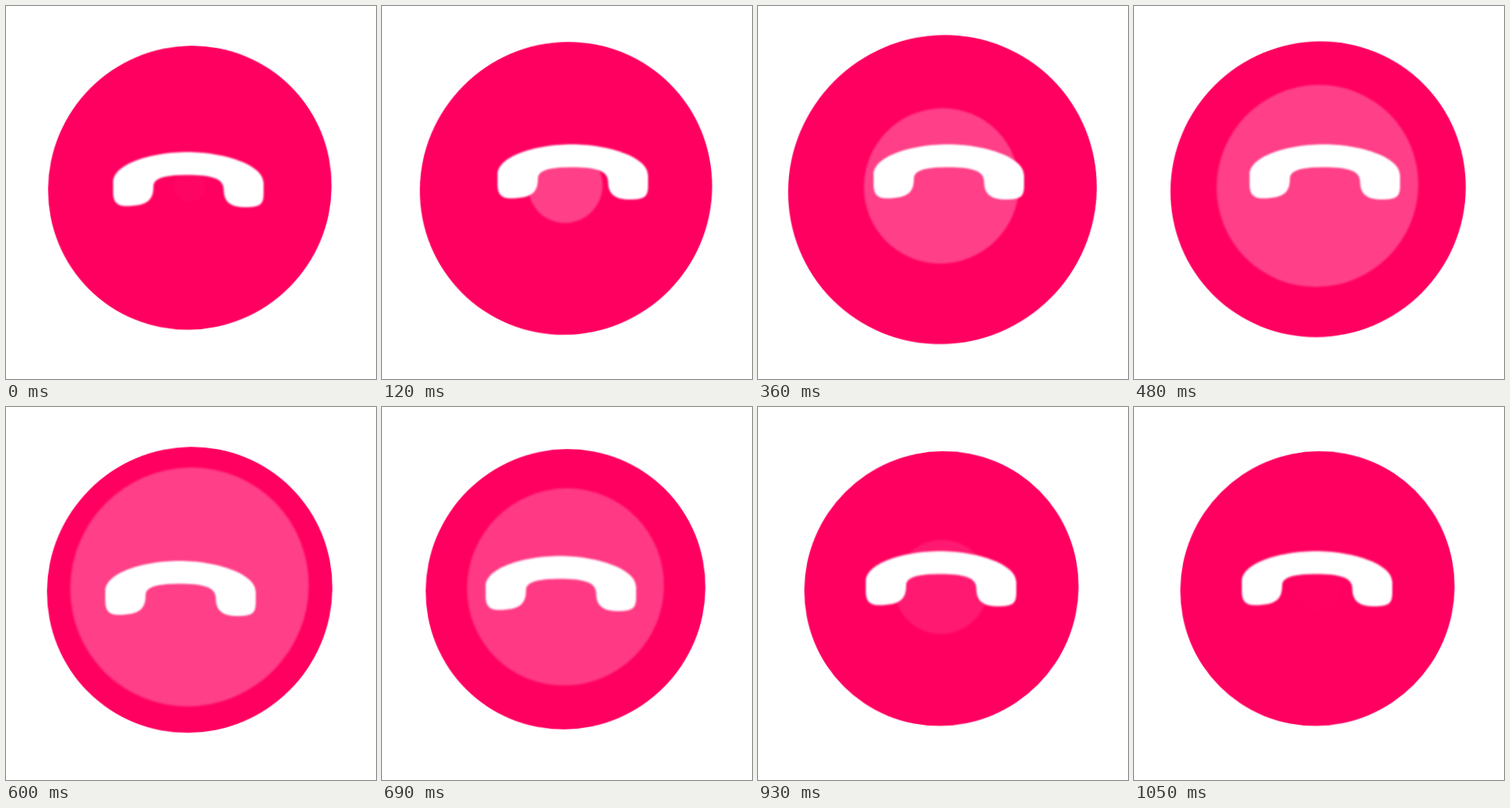
Recreate the animation shown at these times as an HTML page without scripts. Size 477x480 px, loop 1080 ms.

```html
<!DOCTYPE html>
<html lang="en">
<head>
<meta charset="utf-8">
<title>Ringing call button</title>
<style>
  html, body { margin: 0; width: 100%; height: 100%; overflow: hidden; background: #fff; }
  svg { display: block; width: 477px; height: 480px; }
  .disc, .wave, .phone { animation: 1080ms linear infinite; }
  .disc { fill: #ff0060; animation-name: disc; }
  .wave { fill: #fff; animation-name: wave; }
  .phone { fill: #fff; animation-name: shift; }

  @keyframes disc {
    0% { transform: translate(0, -.1px) scale(1.827); }
    22.22% { transform: translate(.4px, 1.5px) scale(1.94); }
    33.33% { transform: translate(.8px, 2.3px) scale(1.99); }
    44.44% { transform: translate(.4px, 1.8px) scale(1.904); }
    55.56% { transform: translate(-.2px, 1.3px) scale(1.84); }
    72%, 100% { transform: translate(-.5px, -.4px) scale(1.768); }
  }
  @keyframes wave {
    0% { transform: scale(.2); opacity: .02; }
    11% { opacity: .25; }
    22.22% { transform: scale(.75); }
    33.33% { transform: scale(.997); }
    44.44% { transform: scale(1.298); }
    55.56% { transform: scale(1.54); opacity: .25; }
    75% { transform: scale(.915); opacity: .19; }
    97.22%, 100% { transform: scale(.3); opacity: .01; }
  }
  @keyframes shift {
    0% { transform: translate(-11px, 10px); }
    11.11%, 47.22% { transform: none; }
    52.78%, 58.33% { transform: translate(-21px, 20px); }
    69.44%, 100% { transform: translate(-10px, 7.5px); }
  }
</style>
</head>
<body>
<svg viewBox="0 0 477 480">
  <defs>
    <filter id="soft" x="-5%" y="-10%" width="110%" height="120%">
      <feGaussianBlur stdDeviation=".9"/>
    </filter>
  </defs>
  <!-- both circles lean slightly towards the upper right -->
  <g transform="translate(237 234) matrix(1 -.008 -.008 1 0 0)">
    <circle class="disc" r="100"/>
  </g>
  <g transform="translate(236.5 231.5) matrix(1 -.008 -.008 1 0 0)" filter="url(#soft)">
    <circle class="wave" r="100"/>
  </g>
  <g class="phone">
    <path filter="url(#soft)" d="M149 217 C149 193 199 178 245 178
      C288 178 343 193 343 218 L343 231 C343 244 340 249 320 249
      C300 249 291.5 242 291.5 226 C291.5 211 273 207.5 245 207.5
      C221 207.5 201 210 201 222 C201 239 194 247.5 166 247.5
      C152 247.5 149 240 149 229 Z"/>
  </g>
</svg>
</body>
</html>
```
